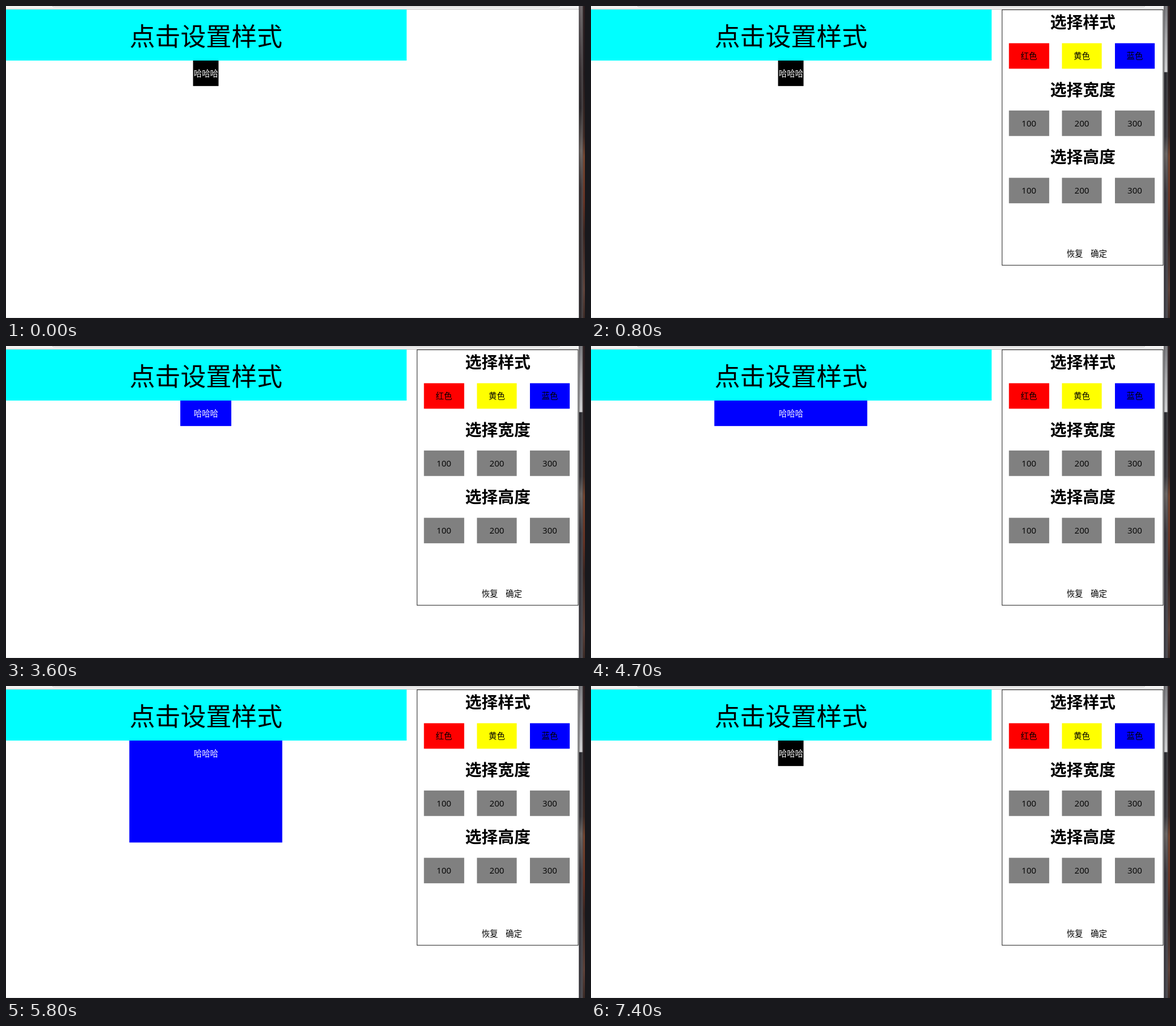
Animation of 1020 by 549 pixels, one loop 8000 ms. Source, as an HTML page with a canvas:

```html
<!DOCTYPE html>
<html lang="zh-CN">
<head>
<meta charset="utf-8">
<title>点击设置样式</title>
<style>
html, body { margin: 0; width: 100%; height: 100%; overflow: hidden; background: #fff; }
canvas { display: block; width: 1020px; height: 549px; }
</style>
</head>
<body>
<canvas id="stage" width="1020" height="549"></canvas>
<script>
const ctx = document.getElementById('stage').getContext('2d');
const LOOP = 8000;
// All drawing uses screen pixels, scaled down to the stage
const W = 1136, H = 612;
ctx.scale(1020 / W, 549 / H);

const CJK = '"Noto Sans CJK SC", "Noto Sans CJK", sans-serif';
const LATIN = '"Open Sans", "Noto Sans", sans-serif';

// Box states: start time, colour, width, height
const states = [
  [0, '#000', 50, 50],
  [1700, '#f00', 50, 50],
  [2400, '#ff0', 50, 50],
  [3000, '#00f', 50, 50],
  [3600, '#00f', 100, 50],
  [4200, '#00f', 200, 50],
  [4700, '#00f', 300, 50],
  [5300, '#00f', 300, 100],
  [5800, '#00f', 300, 200],
  [6400, '#00f', 300, 300],
  [7400, '#000', 50, 50]
];

function rect(x, y, w, h, fill) {
  ctx.fillStyle = fill;
  ctx.fillRect(x, y, w, h);
}

function text(str, x, y, size, color = '#000', weight = 400, family = CJK) {
  ctx.font = `${weight} ${size}px ${family}`;
  ctx.textAlign = 'center';
  ctx.fillStyle = color;
  ctx.fillText(str, x, y);
}

function fade(...stops) {
  const g = ctx.createLinearGradient(0, 0, 0, H);
  stops.forEach(([y, color]) => g.addColorStop(y / H, color));
  return g;
}

function drawBrowser() {
  rect(0, 0, 1124, 6, '#f2f2f2');
  ctx.beginPath();
  ctx.moveTo(91.5, 0);
  ctx.quadraticCurveTo(91.5, 1.5, 94, 1.5);
  ctx.lineTo(1084, 1.5);
  ctx.quadraticCurveTo(1086.5, 1.5, 1086.5, 0);
  ctx.fillStyle = '#fff';
  ctx.fill();
  ctx.strokeStyle = '#b4b4b4';
  ctx.lineWidth = 1;
  ctx.stroke();
  rect(0, 6, 1124, 1, '#b6b6b6');
  rect(0, 611, 1124, 1, '#e4e4e4');
}

// Glass window border; it brightens at the top as the window gains focus
function drawEdge(focus) {
  rect(1124, 0, 8, H, fade([0, '#6b6568'], [122, '#3a3336'], [200, '#2c282b'],
    [284, '#69625f'], [357, '#3b3335'], [H, '#302b2e']));
  ctx.globalAlpha = focus;
  rect(1124, 0, 8, 130, fade([0, '#77777b'], [67, '#a9a9ac'], [130, '#d0d0d2']));
  rect(1124, 130, 8, H - 130, fade([130, '#29292e'], [256, '#39373c'], [290, '#66615f'],
    [368, '#37343a'], [H, '#424148']));
  ctx.globalAlpha = 1;
  rect(1124, 0, 1, H, '#4a474a');
  rect(1130, 0, 1, H, 'rgba(255,255,255,0.4)');
  rect(1131, 0, 1, H, '#1b171a');
  rect(1132, 0, 4, H, fade([0, '#2b1e20'], [134, '#20191c'], [256, '#3c2822'],
    [295, '#70432e'], [385, '#613022'], [446, '#36231f'], [557, '#5c4038'], [H, '#392824']));
}

function drawBox(t) {
  const [, color, w, h] = states.findLast(s => s[0] <= t);
  rect(392 - w / 2, 107, w, h, color);
  text('哈哈哈', 392.4, 138.5, 16, '#fff');
}

function drawRow(title, top, labels, colors, family, size) {
  text(title, 965, top - 29, 32, '#000', 700);
  labels.forEach((label, i) => {
    const x = 819.9 + i * 103.86, left = Math.round(x);
    rect(left, top, Math.round(x + 78.68) - left, 50, colors[i]);
    text(label, x + 39.3, top + 31, size, '#000', 400, family);
  });
}

function drawPanel() {
  rect(806, 7, 317, 502, '#000');
  rect(807, 8, 315, 500, '#fff');
  const sizes = ['100', '200', '300'], gray = Array(3).fill('#808080');
  drawRow('选择样式', 73, ['红色', '黄色', '蓝色'], ['#f00', '#ff0', '#00f'], CJK, 16);
  drawRow('选择宽度', 205, sizes, gray, LATIN, 16.7);
  drawRow('选择高度', 337, sizes, gray, LATIN, 16.7);
  text('恢复', 949.2, 491.2, 16);
  text('确定', 996.4, 491.2, 16);
}

function draw(t) {
  rect(0, 0, W, H, '#fff');
  drawBrowser();
  rect(0, 7, 786, 100, '#0ff');
  text('点击设置样式', 392.4, 78, 50);
  drawBox(t);
  const step = Math.floor((t - 400) / 100);
  drawEdge(Math.min(1, Math.max(0, step / 4)));
  if (t >= 600) drawPanel();
}

const start = performance.now();
function tick() {
  draw((performance.now() - start) % LOOP);
  requestAnimationFrame(tick);
}
tick();
</script>
</body>
</html>
```
